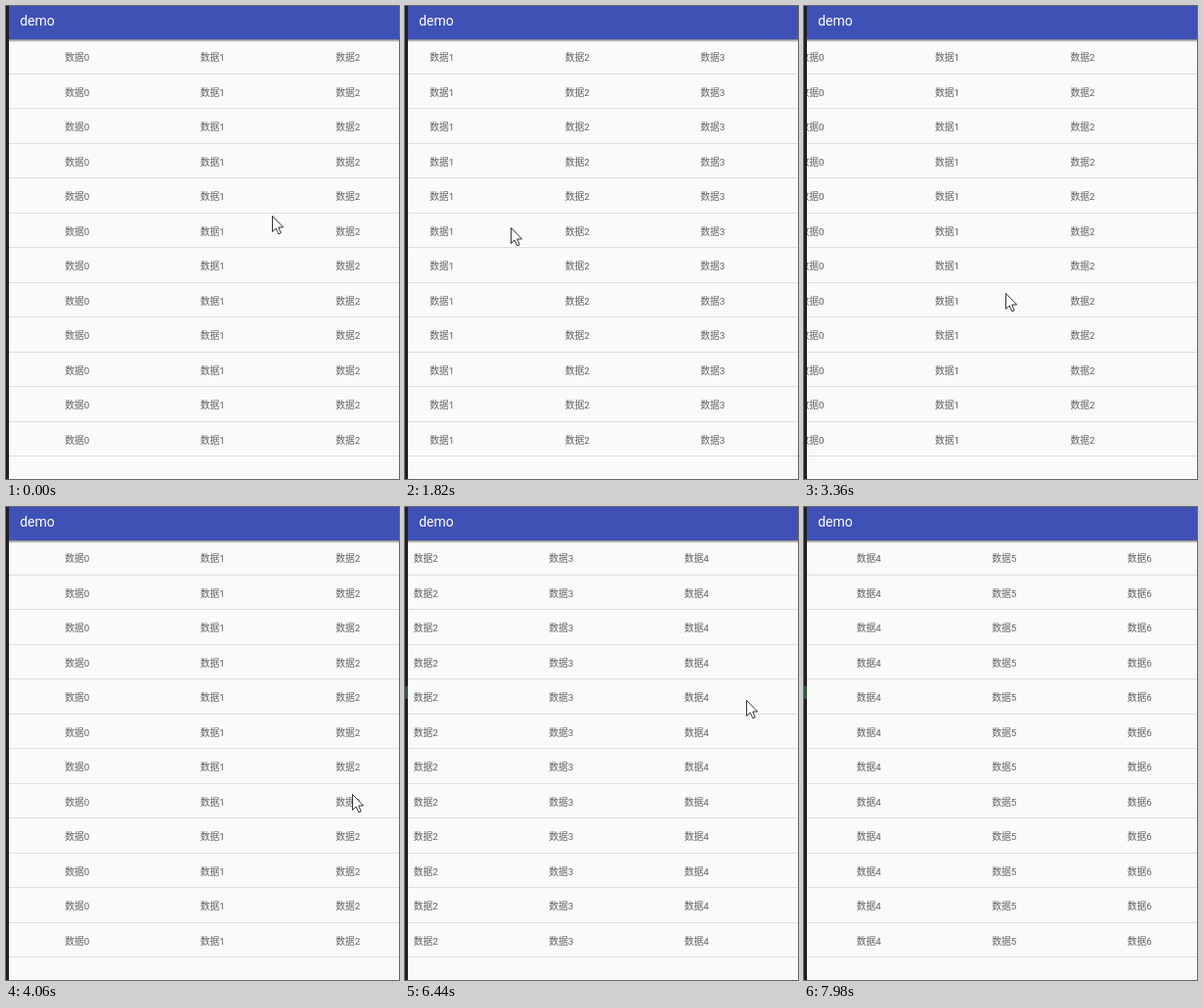
Animation of 402x483 px, one loop 8470 ms. Source, as an HTML page:

```html
<!DOCTYPE html>
<html lang="zh">
<head>
<meta charset="utf-8">
<title>demo</title>
<style>
  html, body { margin: 0; width: 100%; height: 100%; overflow: hidden; background: #fafafa; }
  svg { display: block; width: 402px; height: 483px; }
  text { font-family: Roboto, "Noto Sans CJK SC", "Noto Sans CJK", sans-serif; }
  #cells { font-size: 9.8px; fill: #606060; }
</style>
</head>
<body>
<svg viewBox="0 0 402 483">
  <defs>
    <linearGradient id="shade" x2="0" y2="1">
      <stop offset="0" stop-opacity=".5"/>
      <stop offset="1" stop-opacity="0"/>
    </linearGradient>
  </defs>
  <rect width="402" height="483" fill="#fafafa"/>
  <g id="lines" fill="#dedede"></g>
  <g id="cells"></g>
  <rect y="34" width="402" height="3" fill="url(#shade)"/>
  <rect width="402" height="34" fill="#3f51b5"/>
  <text x="14.2" y="20" font-size="14" fill="#fff">demo</text>
  <rect width="3" height="483" fill="#201e27"/>
  <rect id="mark" y="183" width="3" height="13" fill="#2f5a3c"/>
  <path id="cursor" d="M.5 .5V16.5L4.2 13 6.8 18.8 9.2 17.8 6.7 12H11.6Z"
        fill="#fff" stroke="#33333c"/>
</svg>
<script>
const STEP = 70, LOOP_STEPS = 121;
const ROWS = 12, COLS = 7, ROW_H = 35.5, COL_W = 138.5;
const $ = id => document.getElementById(id);

function add(parent, tag, attrs, label = '') {
  const el = document.createElementNS('http://www.w3.org/2000/svg', tag);
  for (const key in attrs) el.setAttribute(key, attrs[key]);
  el.textContent = label;
  parent.appendChild(el);
}

for (let r = 0; r < ROWS; r++) {
  add($('lines'), 'rect', { x: 3, y: Math.floor(69 + r * ROW_H), width: 399, height: 1 });
  for (let c = 0; c < COLS; c++) {
    add($('cells'), 'text', { x: 60.2 + c * COL_W, y: 56 + r * ROW_H }, '数据' + c);
  }
}

const linear = p => p;
const easeIn = p => p ** 1.5;
const smooth = p => p * p * (3 - 2 * p);

// Pointer moves, timed in steps; a move with a grip also drags the list
const moves = [];
const move = (from, to, x, y, ease = smooth, grip = null) =>
  moves.push({ from, to, x, y, ease, grip });

move(0, 4, 287, 226, linear);
move(9, 16, 170, 226, smooth, 281.5);
move(17, 26, 108, 226, smooth, 281.5);
move(28, 33, 86, 293);
move(34, 39, 134, 293, linear, 270.5);
move(39, 58, 354, 293, easeIn, 270.5);
move(59, 64, 324, 179);
move(65, 75, 66, 179, smooth, 322.5);
move(75, 82, -6, 182, easeIn, 322.5);
move(82, 92, 349, 197);
move(94, 102, 124, 197, smooth, 670.5);
move(104, 114, 110, 490, easeIn, 670.5);

function pose(step) {
  let x = 272, y = 214, scroll = 0;
  for (const m of moves) {
    if (step < m.from) break;
    const p = m.ease(Math.min(1, (step - m.from) / (m.to - m.from)));
    const forward = m.x < x;
    x += (m.x - x) * p;
    y += (m.y - y) * p;
    if (m.grip !== null) {
      const pulled = m.grip - x;
      scroll = forward ? Math.max(scroll, pulled) : Math.max(0, Math.min(scroll, pulled));
    }
  }
  return { x: Math.round(x), y: Math.round(y), scroll };
}

function draw(time) {
  const step = Math.floor(time / STEP) % LOOP_STEPS;
  const { x, y, scroll } = pose(step);
  $('cells').setAttribute('transform', `translate(${-scroll} 0)`);
  $('cursor').setAttribute('transform', `translate(${x} ${y})`);
  // The pointer leaves a trace on the edge after crossing it
  $('mark').setAttribute('visibility', step > 82 ? 'visible' : 'hidden');
}

const start = performance.now();
function tick() {
  draw(performance.now() - start);
  requestAnimationFrame(tick);
}
tick();
</script>
</body>
</html>
```
